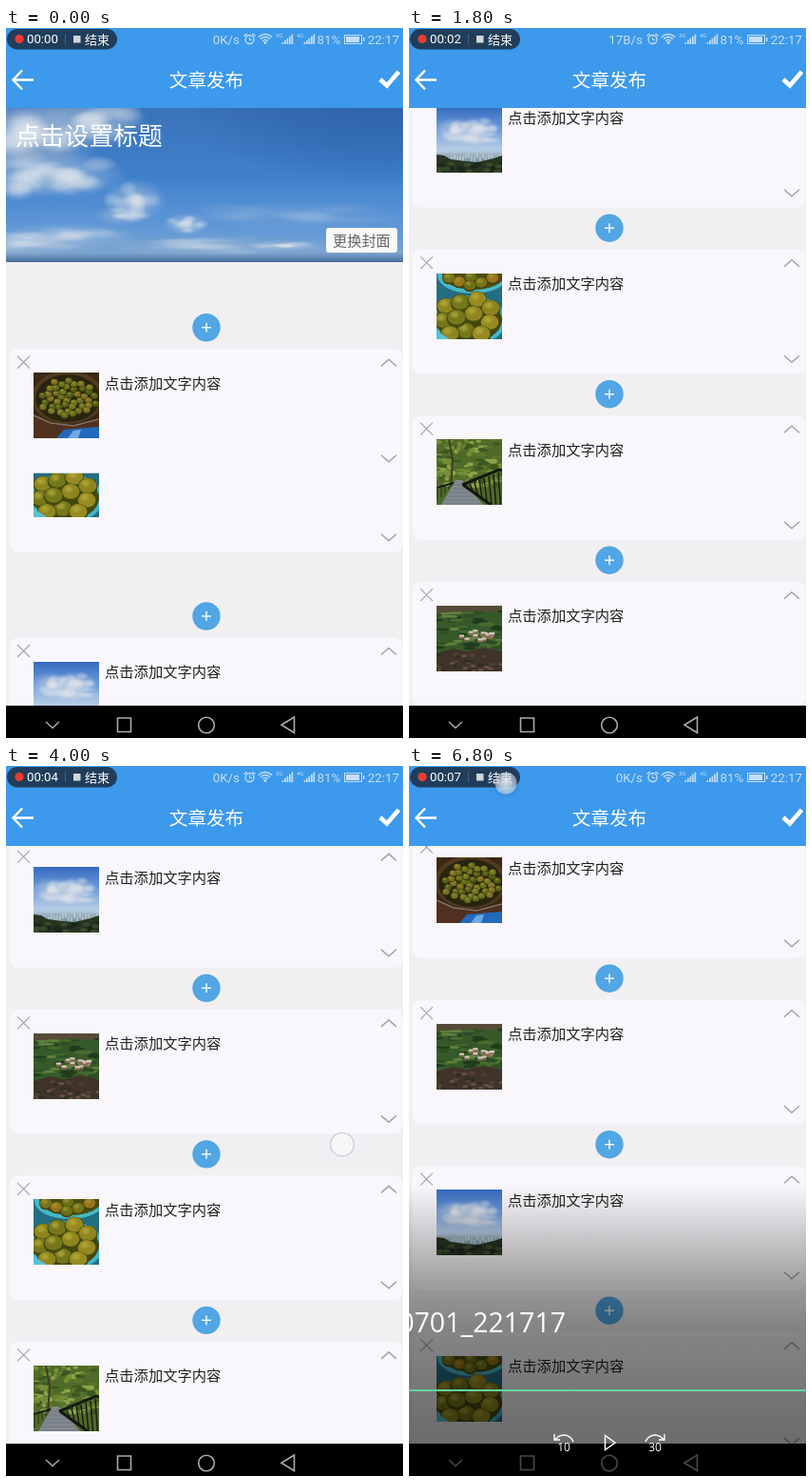
Recreate the animation shown at these times as an HTML page with a canvas. Size 418 px wide and 746 px high, loop 6.9 s.

```html
<!DOCTYPE html>
<html lang="zh-CN">
<head>
<meta charset="utf-8">
<title>文章发布</title>
<style>
html, body { margin: 0; width: 100%; height: 100%; overflow: hidden; background: #000; }
canvas { display: block; width: 418px; height: 746px; }
</style>
</head>
<body>
<canvas id="stage" width="418" height="746"></canvas>
<script>
const ctx = document.getElementById('stage').getContext('2d');
const W = 418, H = 746, LOOP = 6900, STEP = 100;
const TOP = 84, BOTTOM = 712, FIRST = 291.5, PITCH = 174.5, THUMB = 69;
const CJK = '"Noto Sans CJK SC", "Noto Sans CJK", sans-serif';
const LATIN = 'Roboto, sans-serif';
const SWAP_MS = 225;

const startOrder = ['bowl', 'basket', 'sky', 'bridge', 'village'];
const swaps = [
  { at: -148, slot: 0 }, { at: 739, slot: 1 }, { at: 2754, slot: 3 },
  { at: 3250, slot: 2 }, { at: 5345, slot: 1 }
];
const scrollKeys = [[1050, 0], [1600, 407.8], [1800, 407.8], [2400, 411.7], [3870, 411.7], [4400, 220.3]];

const clamp = v => Math.max(0, Math.min(1, v));
const smooth = v => (1 - Math.cos(Math.PI * v)) / 2;

function keyed(keys, t) {
  let value = keys[0][1];
  for (let i = 1; i < keys.length; i++) {
    const [t0, a] = keys[i - 1], [t1, b] = keys[i];
    if (t < t0) break;
    value = a + (b - a) * smooth(clamp((t - t0) / (t1 - t0)));
  }
  return value;
}

function seeded(seed) {
  return () => (seed = (seed * 16807) % 2147483647) / 2147483647;
}

function rect(x, y, w, h, fill) {
  ctx.fillStyle = fill;
  ctx.fillRect(x, y, w, h);
}

function round(x, y, w, h, r, fill) {
  ctx.fillStyle = fill;
  ctx.beginPath();
  ctx.roundRect(x, y, w, h, r);
  ctx.fill();
}

function oval(x, y, rx, ry, fill) {
  ctx.fillStyle = fill;
  ctx.beginPath();
  ctx.ellipse(x, y, rx, ry, 0, 0, Math.PI * 2);
  ctx.fill();
}

function path(points, close) {
  ctx.beginPath();
  for (let i = 0; i < points.length; i += 2) ctx.lineTo(points[i], points[i + 1]);
  if (close) ctx.closePath();
}

function poly(points, fill) {
  path(points, true);
  ctx.fillStyle = fill;
  ctx.fill();
}

function line(points, color, width, close) {
  path(points, close);
  ctx.strokeStyle = color;
  ctx.lineWidth = width;
  ctx.stroke();
}

function circle(x, y, r, color, width) {
  ctx.beginPath();
  ctx.arc(x, y, r, 0, Math.PI * 2);
  ctx.strokeStyle = color;
  ctx.lineWidth = width;
  ctx.stroke();
}

function text(str, x, middle, size, color, family = CJK, align = 'left') {
  ctx.font = size + 'px ' + family;
  ctx.textAlign = align;
  ctx.fillStyle = color;
  ctx.fillText(str, x, middle + size * 0.35);
}

function vertical(y0, y1, ...stops) {
  const g = ctx.createLinearGradient(0, y0, 0, y1);
  stops.forEach(([p, c]) => g.addColorStop(p, c));
  return g;
}

function puff(x, y, rx, ry, rgb, alpha) {
  ctx.save();
  ctx.translate(x, y);
  ctx.scale(rx, ry);
  const g = ctx.createRadialGradient(0, 0, 0, 0, 0, 1);
  g.addColorStop(0, `rgba(${rgb},${alpha})`);
  g.addColorStop(0.5, `rgba(${rgb},${alpha * 0.65})`);
  g.addColorStop(1, `rgba(${rgb},0)`);
  ctx.fillStyle = g;
  ctx.fillRect(-1, -1, 2, 2);
  ctx.restore();
}

// A cloud is a soft body with smaller tufts scattered over it.
function cloud(x, y, rx, ry, alpha, rnd) {
  puff(x, y, rx, ry, '205,214,226', alpha * 0.6);
  for (let i = 0; i < 14; i++) {
    const a = rnd() * Math.PI * 2, d = rnd() * 0.75;
    puff(x + Math.cos(a) * rx * d, y + Math.sin(a) * ry * d, rx * 0.3, ry * 0.35, '222,227,234', alpha * 0.45);
  }
}

function fruits(list, r, colors, shade, shine) {
  list.forEach(([x, y], i) => {
    oval(x, y, r, r * 0.9, shade);
    oval(x, y - r * 0.1, r * 0.9, r * 0.75, colors[i % colors.length]);
    puff(x - r * 0.2, y - r * 0.35, r * 0.55, r * 0.45, shine, 0.8);
  });
}

// Each thumbnail fills a 69 by 69 box.
const thumbs = {
  basket() {
    rect(0, 0, 69, 69, '#3b2715');
    oval(36, 26, 38, 28, '#513a1d');
    oval(36, 27, 34, 25, '#28240d');
    const rnd = seeded(41), list = [];
    for (let i = 0; i < 44; i++) {
      const a = i * 2.4, d = Math.sqrt(i / 44);
      list.push([36 + Math.cos(a) * 30 * d + rnd() * 2, 26 + Math.sin(a) * 20 * d + rnd() * 2]);
    }
    fruits(list, 4, ['#68701c', '#817020', '#555f17', '#767421'], '#363a0d', '150,150,58');
    poly([0, 46, 18, 54, 42, 57, 69, 50, 69, 69, 0, 69], '#50301f');
    line([0, 45, 18, 53, 42, 56, 69, 49], '#857269', 1.5);
    poly([24, 69, 32, 60, 69, 57, 69, 69], '#2469bb');
    poly([36, 69, 42, 61, 50, 60, 47, 69], '#71a7df');
  },
  bowl() {
    rect(0, 0, 69, 69, '#236e83');
    oval(38, 2, 37, 19, '#45b9c8');
    oval(39, 1, 33, 16, '#4c4d10');
    fruits([[13, 5], [24, 9], [36, 4], [47, 10], [59, 5], [35, 13]], 7,
      ['#77751a', '#97751b', '#6a7017'], '#414510', '165,155,50');
    oval(34, 49, 40, 26, '#40b5cf');
    oval(34, 49, 35, 23, '#42480f');
    fruits([[10, 35], [25, 31], [43, 28], [57, 37], [7, 50], [56, 52], [39, 43], [31, 61], [47, 64], [14, 64], [21, 47]],
      10.5, ['#8f851f', '#75771a', '#978a22'], '#444a0d', '184,174,62');
    poly([0, 60, 14, 69, 0, 69], '#57c1d9');
  },
  sky() {
    rect(0, 0, 69, 69, vertical(0, 55, [0, '#356bc0'], [0.45, '#6f9ddb'], [0.8, '#b4cbe5'], [1, '#a3b9cf']));
    const rnd = seeded(19);
    cloud(19, 24, 23, 13, 1, rnd);
    cloud(43, 23, 24, 13, 1, rnd);
    cloud(36, 33, 36, 9, 0.8, rnd);
    rect(0, 48, 69, 10, vertical(48, 58, [0, '#a5bacb'], [1, '#78909c']));
    for (let x = 0; x < 69; x += 3) rect(x, 48 + rnd() * 5, 2, 5, 'rgba(198,212,224,.6)');
    poly([0, 50, 8, 51, 15, 55, 30, 57, 43, 58, 60, 54, 69, 51, 69, 69, 0, 69], '#263422');
    for (let i = 0; i < 20; i++) oval(rnd() * 69, 59 + rnd() * 10, 4, 2, i % 2 ? '#394a2a' : '#1b271c');
  },
  bridge() {
    rect(0, 0, 69, 69, '#506a29');
    const rnd = seeded(73);
    for (let i = 0; i < 110; i++)
      oval(rnd() * 69, rnd() * 50, 2 + rnd() * 4, 1 + rnd() * 2, ['#758d37', '#3c5720', '#8ea249', '#597629'][i % 4]);
    line([13, 0, 17, 22, 15, 50], '#3c3e26', 2);
    poly([20, 43, 27, 43, 49, 69, 5, 69], '#81888f');
    for (let y = 48; y < 69; y += 4) line([20 - (y - 43) * 0.5, y, 27 + (y - 43) * 0.8, y], '#6c747d', 0.8);
    for (let i = 0; i < 9; i++) {
      const x = 30 + i * 5;
      line([x, 49 - i * 2, x + 3, 50 + i * 4], '#181c13', 1.5);
    }
    line([27, 48, 66, 32, 69, 33], '#15180f', 3);
    line([28, 48, 57, 69], '#15180f', 3);
    line([18, 46, 0, 51], '#15180f', 2);
    for (let x = 1; x < 18; x += 4) line([x, 49, x, 66 - x], '#252b1b', 1);
  },
  village() {
    rect(0, 0, 69, 69, '#36592a');
    poly([0, 0, 69, 0, 69, 7, 32, 5, 0, 11], '#574b37');
    const rnd = seeded(55);
    for (let i = 0; i < 55; i++)
      oval(rnd() * 69, 6 + rnd() * 39, 4 + rnd() * 6, 1 + rnd() * 1.5, ['#203b1d', '#60823d', '#2d4d24', '#456c2e'][i % 4]);
    for (let i = 0; i < 14; i++) {
      const x = 21 + rnd() * 36, y = 23 + rnd() * 12;
      rect(x, y, 5, 3, '#dacdc1');
      rect(x, y + 2, 5, 2, '#8a6858');
    }
    poly([0, 50, 17, 45, 32, 48, 51, 44, 69, 48, 69, 69, 0, 69], '#403329');
    for (let i = 0; i < 30; i++) oval(rnd() * 69, 51 + rnd() * 18, 3, 1.5, ['#665047', '#2d301f', '#504037'][i % 3]);
  }
};

function drawCover(y) {
  ctx.save();
  ctx.beginPath();
  ctx.rect(0, y, W, 162);
  ctx.clip();
  ctx.translate(0, y);
  rect(0, 0, W, 162, vertical(0, 162, [0, '#3b72b8'], [0.45, '#4081cd'], [0.78, '#6198d6'], [0.94, '#7ca4cf'], [1, '#476d99']));
  puff(400, 0, 210, 85, '38,91,163', 0.6);
  const rnd = seeded(8);
  const clouds = [
    [25, 28, 75, 42, 0.9], [85, 13, 65, 30, 0.7], [62, 70, 65, 25, 0.8], [20, 72, 55, 24, 0.75],
    [135, 97, 34, 23, 0.75], [122, 113, 32, 11, 0.55], [190, 122, 24, 12, 0.8], [65, 135, 75, 15, 0.5],
    [18, 143, 65, 13, 0.5], [215, 145, 110, 11, 0.35], [294, 145, 42, 6, 0.6], [300, 112, 120, 16, 0.18]
  ];
  clouds.forEach(c => cloud(...c, rnd));
  puff(25, 48, 65, 10, '125,151,184', 0.35);
  ctx.restore();
  text('点击设置标题', 10, y + 30, 25.8, '#fff');
  round(337, y + 126, 75, 26, 3, '#f8f8f9');
  text('更换封面', 344, y + 139.5, 15.2, '#666');
}

function chevron(y, dir) {
  line([395, y + 3.5 * dir, 403, y - 3.5 * dir, 411, y + 3.5 * dir], '#a2a2a7', 1.5);
}

function drawItem(name, top, slot) {
  round(3.5, top, 414, 130.5, 9, '#f9f7fb');
  oval(211, top - 22.5, 14.7, 14.7, '#51a6e3');
  line([206, top - 22.5, 216, top - 22.5], '#fff', 1.4);
  line([211, top - 27.5, 211, top - 17.5], '#fff', 1.4);
  line([12, top + 7.5, 25, top + 20.5], '#a5a5aa', 1.2);
  line([25, top + 7.5, 12, top + 20.5], '#a5a5aa', 1.2);
  if (slot > 0) chevron(top + 14.5, 1);
  if (slot < 4) chevron(top + 115, -1);
  text('点击添加文字内容', 104, top + 36, 15.3, '#222');
  ctx.save();
  ctx.translate(29, Math.round(top + 25));
  ctx.beginPath();
  ctx.rect(0, 0, THUMB, THUMB);
  ctx.clip();
  thumbs[name]();
  ctx.restore();
}

function drawList(t) {
  const scroll = keyed(scrollKeys, t);
  const order = startOrder.slice(), shift = [0, 0, 0, 0, 0];
  for (const { at, slot } of swaps) {
    const p = (t - at) / SWAP_MS;
    if (p >= 1) {
      [order[slot], order[slot + 1]] = [order[slot + 1], order[slot]];
    } else if (p > 0) {
      shift[slot] = PITCH * smooth(p);
      shift[slot + 1] = -shift[slot];
    }
  }
  ctx.save();
  ctx.beginPath();
  ctx.rect(0, TOP, W, BOTTOM - TOP);
  ctx.clip();
  rect(0, TOP, W, BOTTOM - TOP, '#f2eff2');
  if (scroll < 165) drawCover(TOP - scroll);
  order.forEach((name, i) => drawItem(name, FIRST + i * PITCH + shift[i] - scroll, i));
  ctx.restore();
}

function signal(x) {
  for (let i = 0; i < 5; i++) rect(x + i * 2.5, 15 - i * 2.1, 1.7, 2 + i * 2.1, '#c5def6');
}

function drawHeader(t) {
  const pale = '#c5def6';
  rect(0, 0, W, TOP, '#3c99eb');
  round(1, 1, 116, 21.5, 10.7, '#203e5b');
  oval(14, 11.5, 4.6, 4.6, '#f03b30');
  const seconds = Math.floor((t + 300) / 900);
  text('00:0' + seconds, 22, 11.5, 13.2, '#fff', LATIN);
  rect(62, 6, 1, 11, '#4a627a');
  rect(71, 8, 7.5, 7.5, '#d2d6da');
  text('结束', 83, 12, 13, '#fff');

  text(t >= 600 && t < 2500 ? '17B/s' : '0K/s', 246, 12, 13.4, pale, LATIN, 'right');
  circle(256.5, 12, 4.5, pale, 1.3);
  line([256.5, 9.5, 256.5, 12.5, 259, 12.5], pale, 1);
  line([250.5, 8.5, 253.5, 6], pale, 1.3);
  line([259.5, 6, 262.5, 8.5], pale, 1.3);
  for (const r of [3.5, 6.5, 9.5]) {
    ctx.beginPath();
    ctx.arc(273, 16, r, -Math.PI * 0.77, -Math.PI * 0.23);
    ctx.lineWidth = 1.4;
    ctx.stroke();
  }
  oval(273, 15.5, 1.4, 1.4, pale);
  text('3G', 284, 7.5, 6, pale, LATIN);
  signal(290.5);
  text('4G', 306, 7.5, 6, pale, LATIN);
  signal(313.5);
  text('81%', 327.5, 12, 13.4, pale, LATIN);
  ctx.strokeStyle = pale;
  ctx.lineWidth = 1;
  ctx.strokeRect(356.5, 7.5, 18, 9);
  rect(358, 9, 14, 6, pale);
  rect(376, 10, 1.5, 4, pale);
  text('22:17', 414, 12, 13.4, pale, LATIN, 'right');

  line([29, 54.5, 8, 54.5], '#fff', 2.5);
  line([17, 44.5, 7.5, 54.5, 17, 64.5], '#fff', 2.5);
  text('文章发布', 211, 55.5, 19.6, '#fff', CJK, 'center');
  line([394, 54, 401, 60.5, 413.5, 46], '#fff', 4.6);
}

function drawNav() {
  const gray = '#aaa';
  rect(0, BOTTOM, W, H - BOTTOM, '#000');
  line([42, 729, 49, 735.5, 56, 729], gray, 1.5);
  line([117.5, 725, 131.5, 725, 131.5, 739.5, 117.5, 739.5], gray, 1.6, true);
  circle(211, 732.5, 8.3, gray, 1.6);
  line([303.5, 724, 303.5, 740.5, 290, 732.3], gray, 1.6, true);
}

function ring(x, y) {
  oval(x, y, 12, 12, 'rgba(255,255,255,.45)');
  circle(x, y, 12.3, 'rgba(184,188,220,.75)', 1.2);
}

function drawTouch(t) {
  const scroll = keyed(scrollKeys, t);
  if (t >= 600 && t < 800) ring(408, 582);
  if (t >= 1000 && t < 1600) ring(354, 660 - scroll);
  if (t >= 2600 && t < 2800) ring(408, 519);
  if (t >= 3200 && t < 3400) ring(411, 339);
  if (t >= 3800 && t < 4700) ring(354, 782.3 - scroll);
  if (t >= 5200 && t < 5400) ring(408, 361);
  if (t >= 6000) {
    puff(102, 19, 15, 15, '20,45,80', 0.35);
    oval(102, 18, 11.5, 11.5, 'rgba(225,235,245,.55)');
    puff(102, 18, 10, 10, '255,255,255', 0.6);
  }
}

function skipIcon(x, dir, label) {
  ctx.save();
  ctx.translate(x, 711);
  ctx.scale(dir, 1);
  ctx.beginPath();
  ctx.arc(0, 3, 11, -Math.PI * 0.83, -Math.PI * 0.12);
  ctx.strokeStyle = '#fff';
  ctx.lineWidth = 1.4;
  ctx.stroke();
  line([-10, -9, -10, -3, -4, -3], '#fff', 1.4);
  ctx.restore();
  text(label, x, 715.5, 12, '#fff', '"Open Sans", sans-serif', 'center');
}

function drawPlayer(t) {
  if (t < 6600) return;
  ctx.save();
  ctx.globalAlpha = clamp((t - 6500) / 300);
  rect(0, 440, W, H - 440, vertical(440, H,
    [0, 'rgba(0,0,0,0)'], [0.2, 'rgba(0,0,0,.22)'], [0.35, 'rgba(0,0,0,.37)'],
    [0.52, 'rgba(0,0,0,.47)'], [0.8, 'rgba(0,0,0,.55)'], [1, 'rgba(0,0,0,.58)']));
  ctx.font = '28.5px "Open Sans", "Noto Sans", sans-serif';
  ctx.textAlign = 'right';
  ctx.fillStyle = '#fff';
  ctx.fillText('0701_221717', 165, 594.5);
  rect(0, 655, W, 2, '#62d39d');
  skipIcon(163, 1, '10');
  skipIcon(259, -1, '30');
  line([206.5, 703.5, 206.5, 718.5, 217, 711], '#fff', 1.5, true);
  ctx.restore();
}

function frame(now) {
  const t = Math.floor((now % LOOP) / STEP) * STEP;
  drawList(t);
  drawHeader(t);
  drawNav();
  drawTouch(t);
  drawPlayer(t);
}

const start = performance.now();
function tick() {
  frame(performance.now() - start);
  requestAnimationFrame(tick);
}
tick();
</script>
</body>
</html>
```
